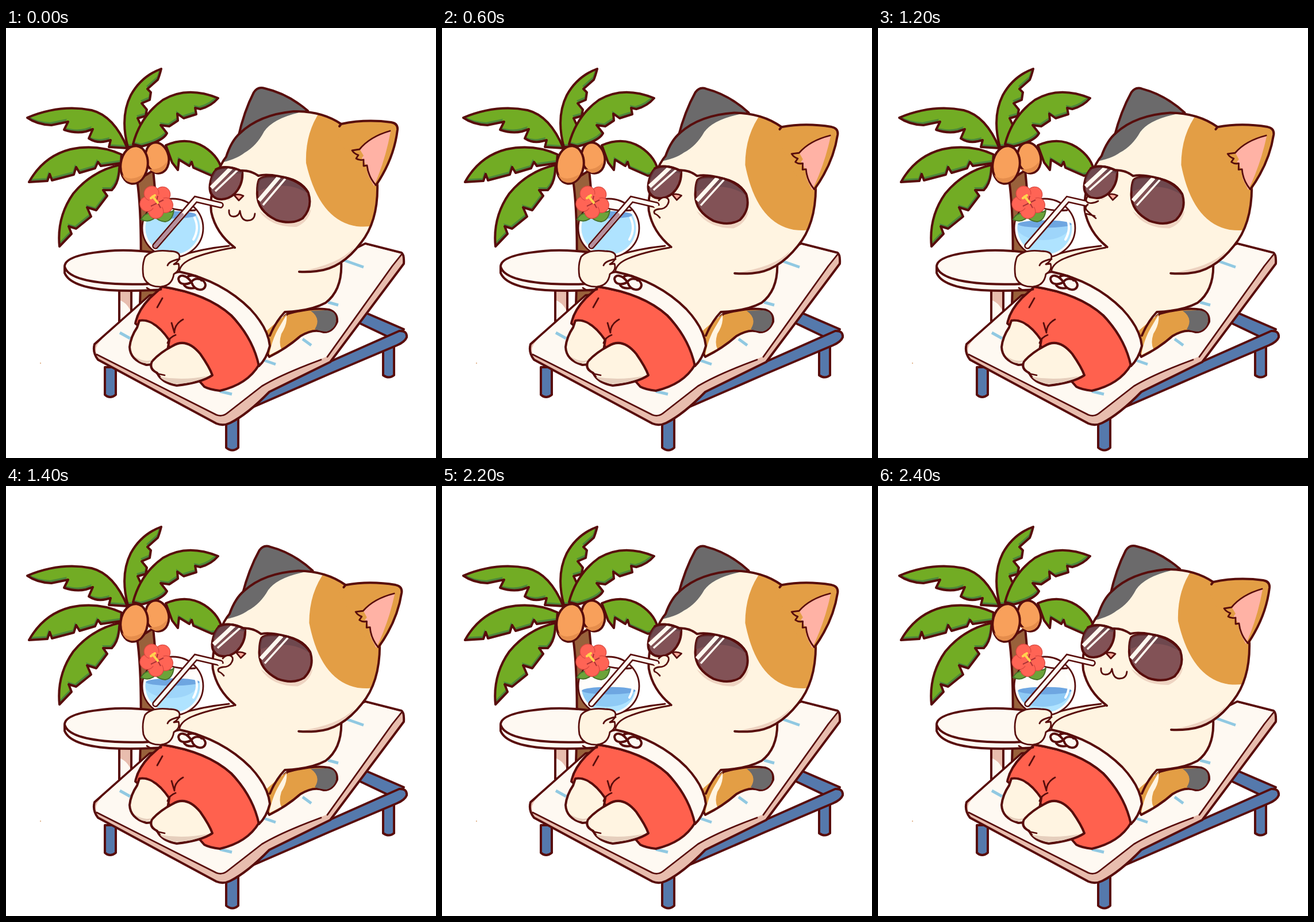
These frames come from a looping animation (748 px wide and 748 px high, 3.4 s). An HTML page:

```html
<!DOCTYPE html>
<html lang="en">
<head>
<meta charset="utf-8">
<title>Cat on a sun lounger</title>
<style>
  html, body { margin: 0; height: 100%; overflow: hidden; background: #fff; }
  svg { display: block; width: 100vw; height: 100vh; }
  .ink { stroke: #580d0c; stroke-width: 4; stroke-linejoin: round; stroke-linecap: round; }
  .thin { stroke-width: 2.8; }
  .line { fill: none; }
  .cream { fill: #fff4e1; }
  .cloth { fill: #fef9f2; }
  .blue { fill: #5579ac; }
  .orange { fill: #e39e45; }
  .gray { fill: #6b6a6b; }
  .shade { fill: #e8bdae; }
  .lens { fill: #825256; }
</style>
</head>
<body>
<svg viewBox="0 0 748 748">
  <defs>
    <clipPath id="bowl"><ellipse cx="290" cy="348" rx="47.5" ry="46"/></clipPath>
    <path id="skull" d="M398 382Q365 357 357 320Q354 290 366 257Q374 235 383 224Q392 196 407 183Q440 151 500 145Q549 144 583 167L646 270Q648 335 618 373Q584 419 540 423Q500 427 460 410Z"/>
    <clipPath id="skullClip"><use href="#skull"/></clipPath>
    <path id="lensL" d="M366 246Q388 237 411 250Q413 272 398 288Q384 301 367 297Q350 290 356 266Q359 253 366 246Z"/>
    <path id="lensR" d="M440 264Q447 255 485 260Q515 266 526 287Q534 312 516 331Q497 343 470 334Q435 317 437 285Q437 271 440 264Z"/>
    <clipPath id="lensClip"><use href="#lensL"/><use href="#lensR"/></clipPath>
  </defs>

  <g id="palm">
    <path class="ink" fill="#99613b" d="M228 265Q238 330 233 482H264Q266 340 256 248Z"/>
    <g id="leaves"></g>
    <ellipse class="ink" cx="263" cy="226" rx="20" ry="27" transform="rotate(-12 263 226)" fill="#f8a05b"/>
    <path fill="#e58d4c" d="M246 245Q269 249 281 231Q277 253 260 252Z"/>
    <ellipse class="ink" cx="223" cy="238" rx="23.5" ry="33" transform="rotate(8 223 238)" fill="#f8a05b"/>
    <path fill="#e58d4c" d="M202 255Q215 269 240 254Q233 271 217 269Q206 267 202 255Z"/>
  </g>

  <g id="table">
    <path class="ink cloth" d="M197 450V510H218V450Z"/>
    <path class="shade" d="M199 458H216V490Q208 477 199 474Z"/>
    <path class="ink cloth" d="M102 415V426Q112 451 180 456Q230 459 300 453V420Z"/>
    <path class="ink cloth" d="M300 400Q250 385 190 387Q102 393 102 415Q108 440 190 445Q245 448 300 440Z"/>
  </g>

  <g id="lounger">
    <path class="ink blue" d="M172 590V638Q181 646 191 638V590Z"/>
    <path class="ink blue" d="M656 545V604Q666 611 675 604V540Z"/>
    <path class="ink blue" d="M612 512L627 496L692 524L675 542Z"/>
    <path class="ink blue" d="M383 670V730Q394 739 404 730V660Z"/>
    <path class="ink blue" d="M400 672L440 640L560 582L684 527Q698 526 697 538Q694 546 680 552L562 602L440 655Z"/>
    <path class="ink shade" d="M625 375L688 391Q693 394 692 410L564 581L458 633Q420 672 390 687Q378 693 366 688L160 577Q150 564 154 550L250 465L500 440Z"/>
    <path class="cloth" d="M625 377L688 393L672 413L557 572Q480 602 445 623L376 676L158 568Q152 555 168 540L250 467L500 440Z"/>
    <path class="ink thin line" d="M688 394L672 414L559 572M548 577Q480 602 445 623L386 669Q377 677 366 673L158 568"/>
    <path fill="none" stroke="#91c9e2" stroke-width="5" d="M588 404L622 416M560 477L578 482M516 541L531 552M446 577L469 585M372 632L393 637M198 530L216 540"/>
  </g>

  <g id="body">
    <path class="ink orange" d="M440 540L490 497Q535 485 562 490Q577 495 576 511Q568 530 552 529Q535 522 512 536Q490 556 458 572Z"/>
    <path class="cream" d="M458 569Q463 535 488 499Q490 515 479 532Q474 548 479 558Z"/>
    <path class="gray" d="M530 492Q549 505 537 524Q550 528 558 528Q574 522 574 508Q575 491 555 491Z"/>
    <path class="cream" d="M288 428L302 398Q340 385 388 379L398 382L520 398L583 405Q586 460 556 478Q530 492 488 492L456 545L400 500Z"/>
    <path class="orange" d="M489 497L459 548L453 527Q470 512 489 497Z"/>
    <path class="ink thin line" d="M300 397Q340 384 388 379M302 421Q305 409 324 401Q350 390 396 382"/>
    <path class="ink line" d="M583 405Q586 455 556 478Q530 492 485 494Q469 511 459 535"/>
    <path class="ink" fill="#ff614e" d="M272 450Q350 462 392 500Q430 540 440 586Q420 620 372 631Q354 629 345 624L280 550L234 521L225 514Q229 492 250 470Z"/>
    <path class="ink cloth" d="M272 450Q284 426 302 424Q376 440 425 489Q456 522 459 553Q453 576 440 588Q430 540 392 500Q350 462 272 450Z"/>
    <path class="ink cream" d="M232 509Q258 505 284 543L280 566Q260 587 244 586Q216 578 215 555Q217 537 228 521Z"/>
    <path class="ink cream" d="M290 553Q314 538 338 567Q354 590 359 604Q340 617 297 622Q270 617 263 600Q248 593 254 580Q267 565 290 553Z"/>
    <path fill="#e6cfbd" d="M268 607Q310 614 352 605Q325 619 295 619Q274 615 268 607ZM222 570Q240 583 255 577Q244 588 231 579Z"/>
    <path class="ink thin line" d="M308 507Q293 515 293 530L288 513M281 548Q284 538 295 534M263 486L272 470M262 601L276 604"/>
    <path class="ink line" d="M323 443C314 428 300 428 300 437C302 449 318 446 323 441C330 432 346 437 347 447C346 459 328 458 323 443ZM317 432Q331 427 340 439M309 446Q314 455 329 452"/>
  </g>

  <g id="head">
    <path class="ink gray" d="M404 190Q414 145 431 112Q438 101 450 105Q490 114 525 144Z"/>
    <use href="#skull" class="cream"/>
    <g clip-path="url(#skullClip)">
      <path class="gray" d="M370 235Q400 229 415 217Q436 205 449 180Q464 158 510 147L490 120L380 150Z"/>
      <path class="orange" d="M550 140Q520 180 522 235Q545 335 610 345Q632 347 650 342L680 200Z"/>
      <path fill="#edd2c0" d="M509 424Q580 411 605 382Q580 430 530 429Z"/>
    </g>
    <path class="ink line" d="M398 382Q365 357 357 320Q354 290 366 257Q374 235 383 224Q392 196 407 183Q440 151 500 145Q549 144 583 167M646 270Q648 335 618 373Q584 419 540 423Q524 425 510 424"/>
    <path class="orange" d="M570 174L583 167Q625 158 670 164Q682 166 681 177Q675 227 646 274L610 250Z"/>
    <path class="ink line" d="M580 171L583 167Q625 158 670 164Q682 166 681 177Q675 227 644 273"/>
    <path fill="#ffb2a5" d="M667 179Q633 189 616 212L622 222L619 226L626 238L630 256L640 275Q660 230 669 180Z"/>
    <path class="ink thin line" d="M668 179Q633 189 615 211L602 213Q606 219 613 221L609 227Q615 231 622 229L622 240L628 239Q630 258 643 273"/>
    <path fill="#eed4c2" d="M440 318Q461 347 505 346Q527 337 531 314L515 335Q476 344 440 318ZM357 290Q376 306 402 294L387 300Z"/>
    <use href="#lensL" class="ink lens"/>
    <use href="#lensR" class="ink lens"/>
    <g clip-path="url(#lensClip)">
      <path fill="#5f4147" opacity=".55" d="M350 238H415V254Q382 249 350 273ZM435 252H535V295Q493 260 435 285Z"/>
      <path fill="none" stroke="#fff9f0" stroke-width="7" d="M357 278L392 243M440 300L475 259"/>
      <path fill="none" stroke="#fff9f0" stroke-width="3.5" d="M364 284L404 246M447 308L486 262"/>
    </g>
    <path class="ink line" d="M365 246Q380 237 408 248Q425 247 439 257Q455 253 485 260Q512 267 525 285"/>
    <path class="ink thin" fill="#ffad9d" d="M397 291Q404 288 413 292L405 300Z"/>
    <path id="smile" class="ink thin line" d="M388 317Q387 328 396 328Q405 328 407 318Q409 335 420 335Q432 335 433 323"/>
  </g>

  <g id="glass">
    <ellipse class="ink thin" cx="290" cy="348" rx="53" ry="51" fill="#fffdfa"/>
    <g clip-path="url(#bowl)">
      <g id="drink">
        <rect x="237" width="106" height="90" fill="#afe3ff"/>
        <ellipse id="depth" cx="287" cy="4" rx="46" ry="24" fill="#8fcaf5"/>
        <path fill="#fffdfa" d="M237 0V-40H343V0Z"/>
        <ellipse id="surface" cx="290" ry="6.5" fill="#6ea6e1"/>
      </g>
    </g>
    <path fill="none" stroke="#fff" stroke-width="4" stroke-linecap="round" d="M328 330Q337 349 326 368"/>
    <path class="ink thin line" d="M286 313Q305 319 329 317"/>
    <path id="strawInk" fill="none" stroke="#580d0c" stroke-width="11.5" stroke-linecap="round"/>
    <path id="strawFill" fill="none" stroke="#fffaf3" stroke-width="6.3" stroke-linecap="round"/>
    <path id="strawWet" fill="none" stroke="#b58f9d" stroke-width="6.3" stroke-linecap="round" d="M260 379L306 325"/>
  </g>

  <g id="lips" class="ink thin">
    <g id="puff">
      <path class="cream" stroke="none" d="M378 298Q386 291 397 297Q394 315 376 320L368 310L379 309Z"/>
      <path class="line" d="M377 300Q383 293 390 295Q397 298 393 306Q389 315 377 315Q366 317 370 323Q374 324 379 330"/>
    </g>
    <g id="suck">
      <path class="cream" stroke="none" d="M362 295L381 298L382 330L361 322Z"/>
      <path class="line" d="M364 294Q359 301 366 304Q374 306 383 301M365 307Q358 312 364 318Q371 325 379 331M362 323L377 327"/>
    </g>
  </g>

  <g id="hand">
    <path class="ink thin cream" d="M242 398Q253 385 283 388Q301 388 302 397Q302 405 292 411L300 410Q304 421 292 428Q289 448 270 450Q245 451 239 432Q236 412 242 398Z"/>
    <path class="ink thin line" d="M302 402Q284 405 281 413M245 452Q255 460 270 455"/>
  </g>

  <g id="flower">
    <path fill="#6ca339" stroke="#46702a" stroke-width="2" d="M235 333Q242 319 258 323L274 318Q289 323 292 316Q290 335 277 337Q265 336 260 329Q249 340 235 333Z"/>
    <g id="petals" fill="#ff6455" stroke="#d94840" stroke-width="1.2"></g>
    <circle cx="262" cy="302" r="13" fill="#ff6455"/>
    <path fill="none" stroke="#a93235" stroke-width="2" d="M264 304L274 299M264 304L269 313M262 305L252 310M262 300L264 292"/>
    <path fill="none" stroke="#ffd34f" stroke-width="4" stroke-linecap="round" d="M264 304L255 293M252 296L259 291"/>
  </g>
  <circle cx="60" cy="583" r="1" fill="#d9a06f"/>
</svg>

<script>
const $ = id => document.getElementById(id);
const show = (id, on) => $(id).style.display = on ? "" : "none";

const leaves = [
  "M212 207Q198 155 217 117Q235 84 270 71Q267 83 264 90L246 106L252 112L250 125L236 131L245 142L243 153L229 157L235 170Q232 190 221 207Z",
  "M221 202Q234 153 273 125Q315 100 369 122Q357 136 338 141L329 139L331 150L309 157L298 149L299 161L284 171L269 169L280 183Q273 197 236 206Z",
  "M278 204Q315 188 345 207Q373 225 377 254L358 257L326 243L323 233L319 240L301 229L299 247L289 234Z",
  "M211 209Q188 153 149 143Q95 132 37 156Q54 168 79 169L108 163L101 177Q121 184 139 180L151 176L144 192Q158 201 174 197L182 195L179 207Z",
  "M201 220Q159 201 112 211Q65 223 40 268L72 266L76 254L80 265L118 255L122 242L128 252L155 244L160 233L165 240L200 235Z",
  "M198 238Q149 249 117 288Q88 329 93 380L114 358L109 345L122 349L148 328L141 312L157 317L176 292L169 282L184 282Q196 270 197 246Z"
];
$("leaves").innerHTML = leaves.map((d, i) => `
  <clipPath id="leaf${i}"><path d="${d}"/></clipPath>
  <path d="${d}" fill="#4c873b"/>
  <g clip-path="url(#leaf${i})"><path d="${d}" fill="#72ac24" transform="translate(-2 -5)"/></g>
  <path d="${d}" class="ink line"/>`).join("");

$("petals").innerHTML = [0, 1, 2, 3, 4].map(i =>
  `<ellipse cx="262" cy="285" rx="13" ry="12.5" transform="rotate(${40 + 72 * i} 262 302)"/>`).join("");

// Start time, mouth and height of the drink's surface.
const poses = [
  [0, "smile", 325], [600, "puff", 325], [800, "suck", 333], [1000, "puff", 333],
  [1200, "suck", 341], [1400, "puff", 341], [1600, "suck", 356], [2200, "puff", 356],
  [2400, "smile", 356]
];

function draw(now) {
  const time = now % 3400;
  const [, mouth, level] = poses.findLast(([start]) => start <= time);
  for (const name of ["smile", "puff", "suck"]) show(name, name === mouth);
  $("head").setAttribute("transform", mouth === "smile" ? "" : "rotate(1.9 430 400)");
  const straw = "M260 379L330 298L" + (mouth === "suck" ? "361 305" : "373 308");
  $("strawInk").setAttribute("d", straw);
  $("strawFill").setAttribute("d", straw);
  show("strawWet", level === 325);
  $("drink").setAttribute("transform", `translate(0 ${level})`);
  $("depth").setAttribute("opacity", (level - 325) / 31);
  $("surface").setAttribute("rx", 47.5 * Math.sqrt(1 - ((level - 348) / 46) ** 2));
  requestAnimationFrame(draw);
}
draw(performance.now());
</script>
</body>
</html>
```
